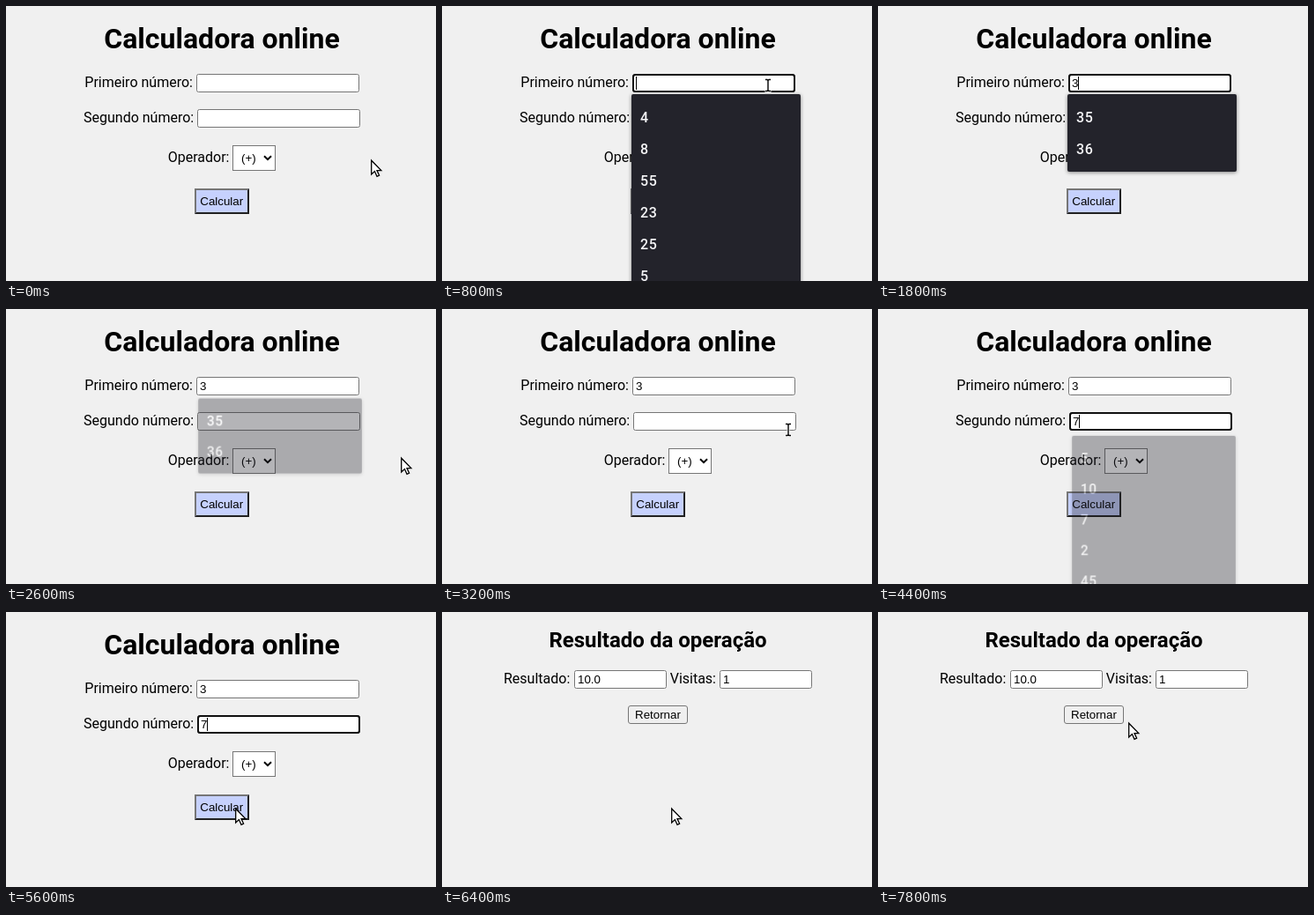
Write an HTML page that moves like this. It is 488 px wide and 312 px high and loops after 8 s.

```html
<!DOCTYPE html>
<html lang="pt">
<head>
<meta charset="utf-8">
<title>Calculadora online</title>
<style>
html, body { margin: 0; width: 100%; height: 100%; overflow: hidden; background: #f0f0f0; }
svg { display: block; width: 488px; height: 312px; }
text { font: 16px Roboto, sans-serif; fill: #000; }
.h1 { font-size: 32px; font-weight: 700; text-anchor: middle; }
.h2 { font-size: 24px; font-weight: 700; text-anchor: middle; }
.ui { font: 13.333px "Liberation Sans", Arial, sans-serif; }
.box { fill: #fff; stroke: #767676; }
.ring { fill: #fff; stroke: #101010; stroke-width: 2; }
.caret { fill: #000; }
.list { filter: drop-shadow(0 1px 2px rgba(0, 0, 0, .45)); }
.list rect { fill: #23232b; }
.list text { font-weight: 500; letter-spacing: .6px; fill: #f4f4f6; }
.lt { fill: #767676; }
.dk { fill: #212121; }

/* Every change is a hard cut; 2.5% is 200 ms. */
.t { animation: 8s step-end infinite; }
#form { animation-name: form; }
#result { animation-name: result; }
#ring1 { animation-name: ring1; }
#ring2 { animation-name: ring2; }
#caret1 { animation-name: caret1; }
#caret2 { animation-name: caret2; }
#num1 { animation-name: num1; }
#num2 { animation-name: num2; }
#all1 { animation-name: all1; }
#some1 { animation-name: some1; transform-origin: 311px 144px; }
#all2 { animation-name: all2; transform-origin: 313px 256px; }
#press { animation-name: press; }
#arrow { animation-name: arrow; }
#beam { animation-name: beam; }

@keyframes form { 0% { opacity: 1 } 80%, 100% { opacity: 0 } }
@keyframes result { 0% { opacity: 0 } 80%, 100% { opacity: 1 } }
@keyframes ring1 { 0%, 32.5%, 100% { opacity: 0 } 7.5% { opacity: 1 } }
@keyframes ring2 { 0%, 75%, 100% { opacity: 0 } 42.5% { opacity: 1 } }
@keyframes num1 { 0% { opacity: 0 } 20%, 100% { opacity: 1 } }
@keyframes num2 { 0% { opacity: 0 } 55%, 100% { opacity: 1 } }
@keyframes caret1 {
  0%, 15%, 100% { opacity: 0; transform: none }
  7.5% { opacity: 1; transform: none }
  20%, 30% { opacity: 1; transform: translateX(7px) }
  25%, 32.5% { opacity: 0; transform: translateX(7px) }
}
@keyframes caret2 {
  0%, 50%, 100% { opacity: 0; transform: none }
  42.5% { opacity: 1; transform: none }
  55%, 70% { opacity: 1; transform: translateX(7px) }
  62.5%, 75% { opacity: 0; transform: translateX(7px) }
}
@keyframes all1 { 0%, 22.5%, 100% { opacity: 0 } 10% { opacity: 1 } }
@keyframes some1 {
  0%, 35%, 100% { opacity: 0; transform: none }
  22.5% { opacity: 1; transform: none }
  32.5% { opacity: .34; transform: scale(.967) }
}
@keyframes all2 {
  0%, 57.5%, 100% { opacity: 0; transform: none }
  42.5% { opacity: 1; transform: none }
  55% { opacity: .34; transform: scale(.967) }
}
@keyframes press { 0%, 80%, 100% { opacity: 0 } 75% { opacity: 1 } }
@keyframes arrow {
  0% { opacity: 1; transform: translate(414px, 174px) }
  2.5% { opacity: 1; transform: translate(474px, 150px) }
  5% { opacity: 1; transform: translate(440px, 104px) }
  7.5%, 40% { opacity: 0; transform: none }
  30% { opacity: 1; transform: translate(452px, 172px) }
  32.5% { opacity: 1; transform: translate(448px, 168px) }
  35% { opacity: 1; transform: translate(432px, 160px) }
  37.5% { opacity: 1; transform: translate(412px, 148px) }
  62.5% { opacity: 1; transform: translate(354px, 160px) }
  65% { opacity: 1; transform: translate(314px, 200px) }
  67.5% { opacity: 1; transform: translate(274px, 225px) }
  70% { opacity: 1; transform: translate(260px, 222px) }
  82.5% { opacity: 1; transform: translate(330px, 220px) }
  85% { opacity: 1; transform: translate(384px, 209px) }
  92.5% { opacity: 1; transform: translate(358px, 180px) }
  95% { opacity: 1; transform: translate(308px, 142px) }
  97.5%, 100% { opacity: 1; transform: translate(284px, 125px) }
}
@keyframes beam {
  0%, 15%, 45%, 100% { opacity: 0; transform: none }
  7.5% { opacity: 1; transform: translate(378px, 91px) }
  10%, 12.5% { opacity: 1; transform: translate(370px, 90px) }
  40% { opacity: 1; transform: translate(393px, 137px) }
}
</style>
</head>
<body>
<svg viewBox="0 0 488 312">
  <rect width="488" height="312" fill="#f0f0f0"/>

  <g id="form" class="t">
    <text class="h1" x="245" y="48">Calculadora online</text>

    <text x="89.3" y="92">Primeiro número:</text>
    <rect class="box" x="216.5" y="77.5" width="184" height="20" rx="2"/>
    <rect id="ring1" class="ring t" x="217" y="78" width="183" height="19" rx="2.5"/>
    <text id="num1" class="ui t" x="220" y="92">3</text>
    <rect id="caret1" class="caret t" x="220" y="80" width="1" height="15"/>

    <text x="88" y="132">Segundo número:</text>
    <rect class="box" x="217.5" y="117.5" width="184" height="20" rx="2"/>
    <rect id="ring2" class="ring t" x="218" y="118" width="183" height="19" rx="2.5"/>
    <text id="num2" class="ui t" x="221" y="132">7</text>
    <rect id="caret2" class="caret t" x="221" y="120" width="1" height="15"/>

    <text x="183.7" y="177">Operador:</text>
    <rect class="box" x="257.5" y="158.5" width="48" height="28"/>
    <text class="ui" x="267" y="177">(+)</text>
    <path d="M293 170.2l4 4 4-4" fill="none" stroke="#000" stroke-width="2"/>

    <rect x="214" y="207" width="62" height="29" fill="#c6d1fd"/>
    <path class="lt" d="M214 236V207H276L274 209H216V234Z"/>
    <path class="dk" d="M214 236H276V207L274 209V234H216Z"/>
    <g id="press" class="t">
      <path class="dk" d="M214 236V207H276L274 209H216V234Z"/>
      <path class="lt" d="M214 236H276V207L274 209V234H216Z"/>
    </g>
    <text class="ui" x="220.3" y="226">Calcular</text>

    <g id="all1" class="list t">
      <rect x="215" y="100" width="192" height="232" rx="2"/>
      <text y="132"><tspan x="225">4</tspan><tspan x="225" dy="36">8</tspan><tspan x="225" dy="36">55</tspan><tspan x="225" dy="36">23</tspan><tspan x="225" dy="36">25</tspan><tspan x="225" dy="36">5</tspan></text>
    </g>
    <g id="some1" class="list t">
      <rect x="215" y="100" width="192" height="88" rx="2"/>
      <text y="132"><tspan x="225">35</tspan><tspan x="225" dy="36">36</tspan></text>
    </g>
    <g id="all2" class="list t">
      <rect x="217" y="140" width="192" height="232" rx="2"/>
      <text y="172"><tspan x="227">5</tspan><tspan x="227" dy="36">10</tspan><tspan x="227" dy="36">7</tspan><tspan x="227" dy="36">2</tspan><tspan x="227" dy="36">45</tspan><tspan x="227" dy="36">8</tspan></text>
    </g>
  </g>

  <g id="result" class="t">
    <text class="h2" x="245" y="40">Resultado da operação</text>
    <text x="70" y="81">Resultado:</text>
    <rect class="box" x="150.5" y="66.5" width="104" height="20" rx="2"/>
    <text class="ui" x="154" y="81">10.0</text>
    <text x="258.7" y="81">Visitas:</text>
    <rect class="box" x="315.5" y="66.5" width="104" height="20" rx="2"/>
    <text class="ui" x="319" y="81">1</text>
    <rect x="211.5" y="106.5" width="67" height="20" rx="2.5" fill="#efefef" stroke="#767676"/>
    <text class="ui" x="219" y="121">Retornar</text>
  </g>

  <g id="beam" class="t" fill="none">
    <path d="M-3.5-6.5H3.5M-3.5 6.5H3.5M0-6.5V6.5" stroke="#fff" stroke-width="3"/>
    <path d="M-3-6.5H-1L0-5.5 1-6.5H3M-3 6.5H-1L0 5.5 1 6.5H3M0-5.5V5.5" stroke="#000" stroke-width="1.4"/>
  </g>
  <g id="arrow" class="t">
    <path d="M.7 1.2V17L4.4 13.6 7 19.3 9.6 18.1 7 12.6H11.8Z" fill="#fff" stroke="#000" stroke-width="1.3"/>
  </g>
</svg>
</body>
</html>
```
